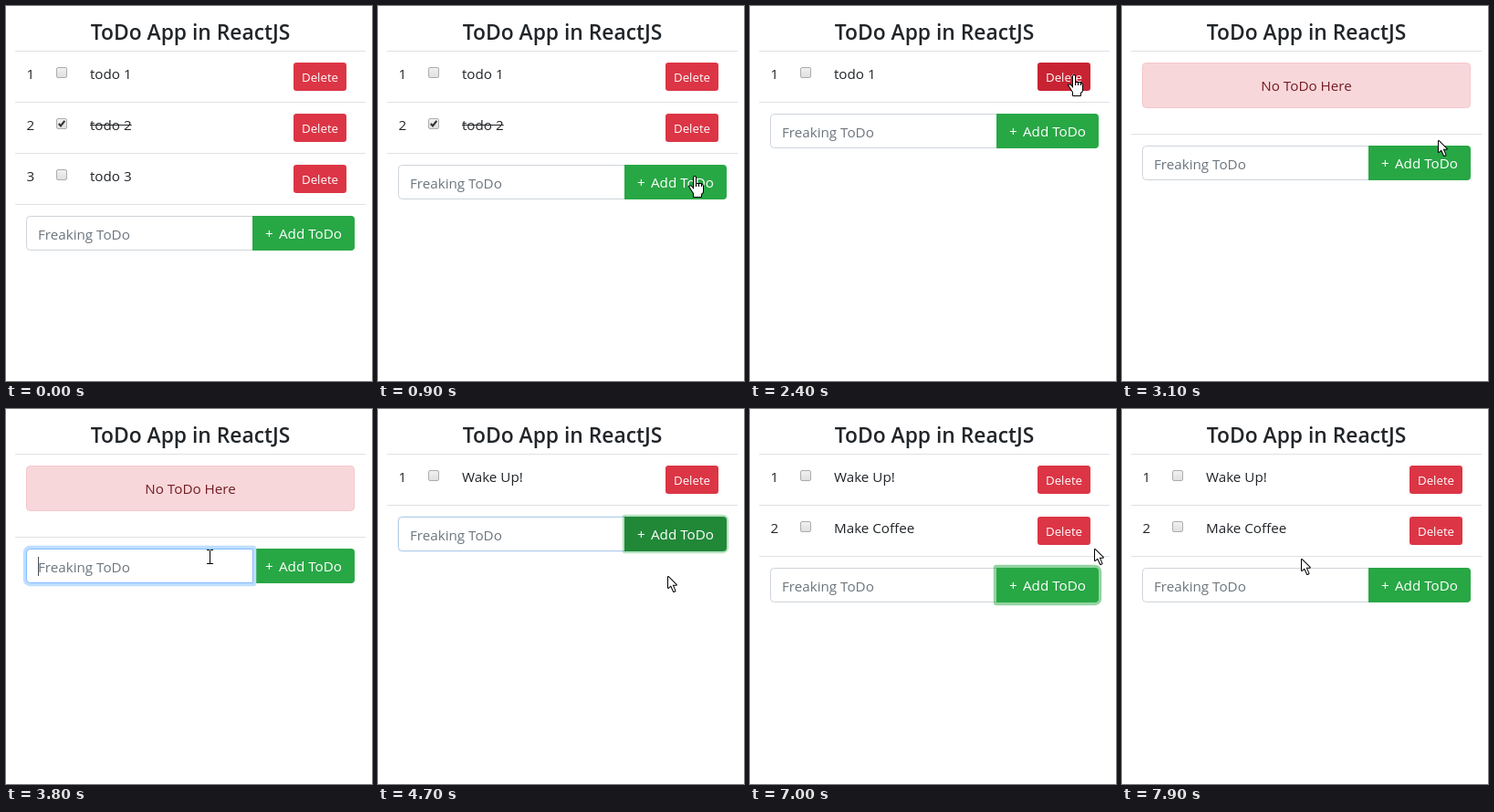
Write an HTML page with a canvas that moves like this. It is 401 by 411 pixels and loops after 8 s.

```html
<!DOCTYPE html>
<html lang="en">
<head>
<meta charset="utf-8">
<title>ToDo App</title>
<style>
  html, body { margin: 0; width: 100%; height: 100%; overflow: hidden; background: #fff; }
  canvas { display: block; }
</style>
</head>
<body>
<canvas id="stage" width="401" height="411"></canvas>
<script>
const ctx = document.getElementById('stage').getContext('2d');
const LOOP = 8000, STEP = 100;
const FAMILY = '"Open Sans", "Noto Sans", sans-serif';
const INK = '#212529', LINE = '#dee2e6';
const ROW_TOP = 49, ROW_HEIGHT = 56;

// Every item lives from its adding to its deleting.
const ITEMS = [
  { label: 'todo 1', to: 2600 },
  { label: 'todo 2', to: 1800, done: true },
  { label: 'todo 3', to: 900 },
  { label: 'Wake Up!', from: 4700, focus: 3600, typed: 3800 },
  { label: 'Make Coffee', from: 6700, focus: 5900, typed: 6000 }
];
const TYPED = ITEMS.filter(item => item.from);
const INPUT_FOCUS = [[3600, 4600], [5900, 6700]];
const ADD_FOCUS = [[4600, 5900], [6700, 7700]];

// Pointer stops; it glides smoothly from one to the next.
const STOPS = [
  { at: 100, x: 378, y: 376 },
  { at: 700, x: 346, y: 186, until: 1000 },
  { at: 1600, x: 346, y: 140, until: 1900 },
  { at: 2300, x: 354, y: 75, until: 2600 },
  { at: 2900, x: 389, y: 140 },
  { at: 3500, x: 223, y: 162, until: 4200 },
  { at: 4400, x: 317, y: 182, until: 4700 },
  { at: 4900, x: 390, y: 136, until: 5000 },
  { at: 5900, x: 226, y: 144, until: 6200 },
  { at: 6400, x: 378, y: 152, until: 6700 },
  { at: 7200, x: 376, y: 152, until: 7300 },
  { at: 7800, x: 196, y: 163, until: LOOP }
];

const clamp = v => Math.max(0, Math.min(1, v));
const smooth = k => k * k * (3 - 2 * k);
const lerp = (a, b, k) => Math.round(a + (b - a) * k);
const inside = (p, x, y, w, h) => p && p.x >= x && p.x < x + w && p.y >= y && p.y < y + h;
const active = (spans, t) => spans.some(([on, off]) => t >= on && t < off);
const focusLevel = (spans, t) => Math.max(...spans.map(([on, off]) =>
  Math.min(clamp((t - on) / 150), clamp(1 - (t - off) / 150))));
const itemsAt = t => ITEMS.filter(({ from = -STEP, to = LOOP }) => t >= from && t < to);
const formTop = items => items.length ? ROW_TOP + items.length * ROW_HEIGHT + 13 : 153;

function pointerAt(t) {
  const i = STOPS.findLastIndex(stop => stop.at <= t);
  if (i < 0) return null;
  const a = STOPS[i], b = STOPS[i + 1] || a, leave = a.until || a.at;
  const k = t > leave ? smooth((t - leave) / (b.at - leave)) : 0;
  return { x: lerp(a.x, b.x, k), y: lerp(a.y, b.y, k) };
}

// Index of a row's Delete button, 'add', 'input' or null.
function targetAt(t) {
  const p = pointerAt(t), items = itemsAt(t), top = formTop(items);
  if (inside(p, 270, top, 112, 38)) return 'add';
  if (inside(p, 22, top, 248, 38)) return 'input';
  const row = items.findIndex((_, i) => inside(p, 315, 62 + i * ROW_HEIGHT, 58, 31));
  return row < 0 ? null : row;
}

function box(x, y, w, h, radii, fill, stroke) {
  ctx.beginPath();
  ctx.roundRect(x, y, w, h, radii);
  ctx.fillStyle = fill;
  ctx.fill();
  if (!stroke) return;
  ctx.strokeStyle = stroke;
  ctx.lineWidth = 1;
  ctx.stroke();
}

function text(str, x, y, size = 15.2, color = INK, align = 'left', weight = 400) {
  ctx.font = `${weight} ${size}px ${FAMILY}`;
  ctx.fillStyle = color;
  ctx.textAlign = align;
  ctx.fillText(str, x, y);
  return ctx.measureText(str).width;
}

function rule(y) {
  ctx.fillStyle = LINE;
  ctx.fillRect(10, y, 384, 1);
}

function checkbox(x, y, checked) {
  const shade = ctx.createLinearGradient(0, y, 0, y + 12);
  shade.addColorStop(0, '#f2f2f2');
  shade.addColorStop(1, '#dedede');
  box(x + .5, y + .5, 11, 11, 1.5, shade, '#adadad');
  if (!checked) return;
  ctx.beginPath();
  ctx.moveTo(x + 2.8, y + 6);
  ctx.lineTo(x + 5, y + 8.4);
  ctx.lineTo(x + 9.3, y + 2.8);
  ctx.strokeStyle = '#333';
  ctx.lineWidth = 2.2;
  ctx.stroke();
}

function drawRow({ label, done }, i, hovered) {
  const y = ROW_TOP + i * ROW_HEIGHT;
  text(i + 1, 22.5, y + 31);
  checkbox(55, y + 18, done);
  const width = text(label, 92, y + 31);
  if (done) ctx.fillRect(92, y + 25, width, 1);
  box(315, y + 13, 58, 31, 3.2, hovered ? '#c82333' : '#dc3545');
  text('Delete', 344, y + 34, 13.3, '#fff', 'center');
  rule(y + ROW_HEIGHT);
}

function drawAlert() {
  box(22.5, 62.5, 359, 49, 4, '#f8d7da', '#f5c6cb');
  text('No ToDo Here', 202, 93, 15.2, '#721c24', 'center');
  rule(140);
}

function drawInput(t, y) {
  const level = focusLevel(INPUT_FOCUS, t), s = 3.2 * level;
  if (level) {
    for (const fill of ['#fff', `rgba(0,123,255,${.25 * level})`]) {
      box(22 - s, y - s, 249 + 2 * s, 38 + 2 * s, [4 + s, s, s, 4 + s], fill);
    }
  }
  const border = `rgb(${lerp(206, 128, level)},${lerp(212, 189, level)},${lerp(218, 255, level)})`;
  box(22.5, y + .5, 248, 37, [4, 0, 0, 4], '#fff', border);

  const entry = TYPED.find(item => t > item.typed && t < item.from);
  let width = 0;
  if (entry) {
    const count = Math.ceil(entry.label.length * clamp((t - entry.typed) / 350));
    width = text(entry.label.slice(0, count), 35, y + 26, 15.2, '#495057');
  } else {
    text('Freaking ToDo', 35, y + 26, 15.2, '#6c757d');
  }
  if (active(INPUT_FOCUS, t)) {
    ctx.fillStyle = '#495057';
    ctx.fillRect(Math.round(35 + width), y + 9, 1, 21);
  }
}

function drawAdd(t, y, hovered) {
  const level = focusLevel(ADD_FOCUS, t), s = 3.2 * level;
  if (level) {
    box(270 - s, y - s, 112 + 2 * s, 38 + 2 * s, [s, 4 + s, 4 + s, s], `rgba(40,167,69,${.5 * level})`);
  }
  box(270, y, 112, 38, [0, 4, 4, 0], hovered ? '#218838' : '#28a745');
  text('+', 284, y + 25, 15.2, '#fff');
  text('Add ToDo', 299, y + 25, 15.2, '#fff');
}

// Stroking first leaves only the outer edge of the joined shapes.
function outlined(path, x, y) {
  ctx.save();
  ctx.translate(x, y);
  ctx.lineWidth = 2;
  ctx.lineJoin = 'round';
  ctx.strokeStyle = '#000';
  ctx.fillStyle = '#fff';
  ctx.stroke(path);
  ctx.fill(path);
  ctx.restore();
}

const ARROW = new Path2D('M1 2V14L4 11.5L7 18L8.5 17.3L5.7 10.8H9.8Z');
const HAND = new Path2D('M-5 11.5L-3 11.5L0 15L4 14L1 21Z');
HAND.roundRect(0, 1, 2, 15, 1);
HAND.roundRect(0, 9, 10, 11, [0, 3, 3, 2]);
HAND.rect(0, 18, 8, 5);

function drawIBeam(x, y) {
  ctx.fillStyle = '#000';
  ctx.fillRect(x, y - 7, 1, 15);
  for (const dy of [-8, 7]) {
    ctx.fillRect(x - 3, y + dy, 3, 1);
    ctx.fillRect(x + 1, y + dy, 3, 1);
  }
}

function drawHand(x, y) {
  outlined(HAND, x, y);
  ctx.fillStyle = '#000';
  for (let dx = 2; dx < 9; dx += 3) ctx.fillRect(x + dx, y + 8, 1, 4);
}

function drawPointer(t) {
  const p = pointerAt(t), target = targetAt(t);
  if (!p) return;
  if (target === 'input') drawIBeam(p.x, p.y);
  else if (target === null) outlined(ARROW, p.x, p.y);
  else drawHand(p.x, p.y);
}

function draw(t) {
  const items = itemsAt(t), y = formTop(items);
  const hovered = targetAt(t - STEP); // hover colours trail the pointer
  ctx.fillStyle = '#fff';
  ctx.fillRect(0, 0, 401, 411);
  text('ToDo App in ReactJS', 202, 37, 22.8, INK, 'center', 600);
  rule(ROW_TOP);
  if (items.length) items.forEach((item, i) => drawRow(item, i, hovered === i));
  else drawAlert();

  const parts = [() => drawInput(t, y), () => drawAdd(t, y, hovered === 'add')];
  if (active(INPUT_FOCUS, t)) parts.reverse();
  parts.forEach(part => part());
  drawPointer(t);
}

const start = performance.now();
function tick() {
  const t = (performance.now() - start) % LOOP;
  draw(Math.floor(t / STEP) * STEP);
  requestAnimationFrame(tick);
}
tick();
</script>
</body>
</html>
```
